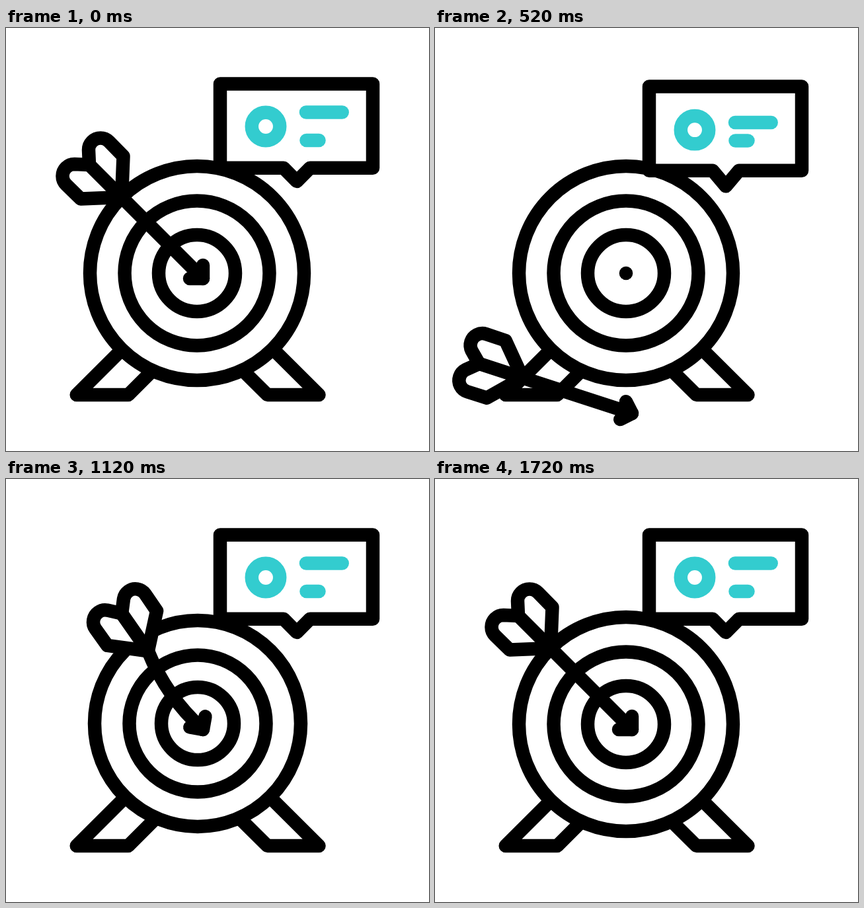
These frames come from a looping animation (640 px wide and 640 px high, 2 s). An HTML page with a canvas:

```html
<!DOCTYPE html>
<html lang="en">
<head>
<meta charset="utf-8">
<title>Target</title>
<style>
  html, body { margin: 0; width: 100%; height: 100%; overflow: hidden; background: #fff; }
  canvas { display: block; width: 100%; height: 100%; }
</style>
</head>
<body>
<canvas id="stage"></canvas>
<script>
const SIZE = 640, LOOP = 2000, STEP = 40, LINE = 20.5;
const INK = '#000', TEAL = '#33cccf', PAPER = '#fff';
const canvas = document.getElementById('stage');
const ctx = canvas.getContext('2d');

// Cosine-eased value from [time, value] keys.
function track(t, ...keys) {
  if (t <= keys[0][0]) return keys[0][1];
  for (let i = 1; i < keys.length; i++) {
    const [t0, a] = keys[i - 1], [t1, b] = keys[i];
    if (t <= t1) return a + (b - a) * (1 - Math.cos(Math.PI * (t - t0) / (t1 - t0))) / 2;
  }
  return keys[keys.length - 1][1];
}

// Bubble parts hop up, drop, rise past rest and settle.
const hop = (t, up, down, backAt, back) =>
  track(t, [0, 0], [120, up], [300, down], [backAt, back], [1080, 0]);

function path(points, closed, fill) {
  ctx.beginPath();
  points.forEach(([x, y]) => ctx.lineTo(x, y));
  if (closed) ctx.closePath();
  if (fill) ctx.fill();
  ctx.stroke();
}

function ring(x, y, r, fill) {
  ctx.beginPath();
  ctx.arc(x, y, r, 0, 2 * Math.PI);
  if (fill) ctx.fill();
  ctx.stroke();
}

function drawLegs() {
  path([[200, 462], [106.7, 555], [185, 555], [240, 500]]);
  path([[380, 462], [473.5, 555], [395.5, 555], [340, 500]]);
}

function drawTarget(t) {
  const hit = track(t, [1060, 0], [1120, 1], [1240, 0]);
  const x = 289 + hit, y = 371 - hit;
  ring(x, y, 162 - 6 * hit, true);
  ring(x, y, 109.5 - 6 * hit);
  ring(x, y, 58 - 3 * hit);
  ctx.fillStyle = INK;
  ctx.beginPath();
  ctx.arc(x, y, 10.3, 0, 2 * Math.PI);
  ctx.fill();
  ctx.fillStyle = PAPER;
}

function drawBubble(t) {
  const box = hop(t, -8, 17.3, 680, -4);
  const tip = hop(t, -10, 23.5, 700, -4.5);
  const disc = hop(t, -10, 25.5, 670, -6);
  const bar1 = hop(t, -10, 36, 740, -5);
  const bar2 = hop(t, -10, 25.5, 640, -9);
  const top = 84.5 + box, low = 211.7 + box;
  path([[324, top], [555, top], [555, low], [460, low],
        [440, 232 + tip], [420, low], [324, low]], true, true);
  ctx.strokeStyle = TEAL;
  ring(393, 149 + disc, 21.2);
  path([[454, 127.5 + bar1], [508.7, 127.5 + bar1]]);
  path([[454.5, 170 + bar2], [473.5, 170 + bar2]]);
  ctx.strokeStyle = INK;
}

function arrowPose(t) {
  const pose = { x: 0, y: 0, turn: 0, push: 0, bow: 0 };
  if (t < 900) {
    const fall = Math.pow(Math.max(0, t - 60) / 460, 1.777);
    pose.y = 204 * fall;
    pose.turn = -27 * fall;
  } else if (t < 1080) {
    pose.x = pose.y = -2.1 * (1080 - t);
  } else {
    pose.turn = track(t, [1080, 0], [1120, 10], [1280, -0.7], [1440, 5.3], [1720, 0]);
    pose.push = track(t, [1080, 0], [1120, 29], [1240, 0]);
    pose.bow = track(t, [1080, 0], [1120, 17], [1280, 0], [1440, -14], [1600, 4], [1720, 0]);
  }
  return pose;
}

function feather() {
  ctx.beginPath();
  ctx.moveTo(-172, -172);
  ctx.lineTo(-173, -194.5);
  ctx.arc(-155, -194.5, 18, Math.PI, 1.75 * Math.PI);
  ctx.lineTo(-120.5, -185);
  ctx.lineTo(-123, -123);
  ctx.fill();
  ctx.stroke();
}

// Local origin is the arrow tip; the shaft runs up and to the left.
function drawArrow(t) {
  const { x, y, turn, push, bow } = arrowPose(t);
  const shift = push * Math.SQRT1_2, bend = bow * Math.SQRT1_2;
  ctx.save();
  ctx.translate(298 + x, 379 + y);
  ctx.rotate(turn * Math.PI / 180);

  ctx.save();
  ctx.translate(shift, shift);
  feather();
  ctx.transform(0, 1, 1, 0, 0, 0); // mirror across the shaft
  feather();
  ctx.restore();

  const base = -123 + shift;
  ctx.beginPath();
  ctx.moveTo(-172 + shift, -172 + shift);
  ctx.lineTo(base, base);
  ctx.quadraticCurveTo(base / 2 - bend, base / 2 + bend, 0, 0);
  ctx.stroke();
  path([[-20, 0], [0, 0], [0, -20]]);
  ctx.restore();
}

function draw(t) {
  const dpr = window.devicePixelRatio || 1;
  const w = Math.round(innerWidth * dpr), h = Math.round(innerHeight * dpr);
  if (canvas.width !== w || canvas.height !== h) {
    canvas.width = w;
    canvas.height = h;
  }
  ctx.setTransform(w / SIZE, 0, 0, h / SIZE, 0, 0);
  ctx.fillStyle = PAPER;
  ctx.fillRect(0, 0, SIZE, SIZE);
  ctx.strokeStyle = INK;
  ctx.lineWidth = LINE;
  ctx.lineCap = ctx.lineJoin = 'round';
  drawLegs();
  drawTarget(t);
  drawBubble(t);
  drawArrow(t);
}

const start = performance.now();
function tick() {
  const t = (performance.now() - start) % LOOP;
  draw(Math.floor(t / STEP) * STEP);
  requestAnimationFrame(tick);
}
tick();
</script>
</body>
</html>
```
